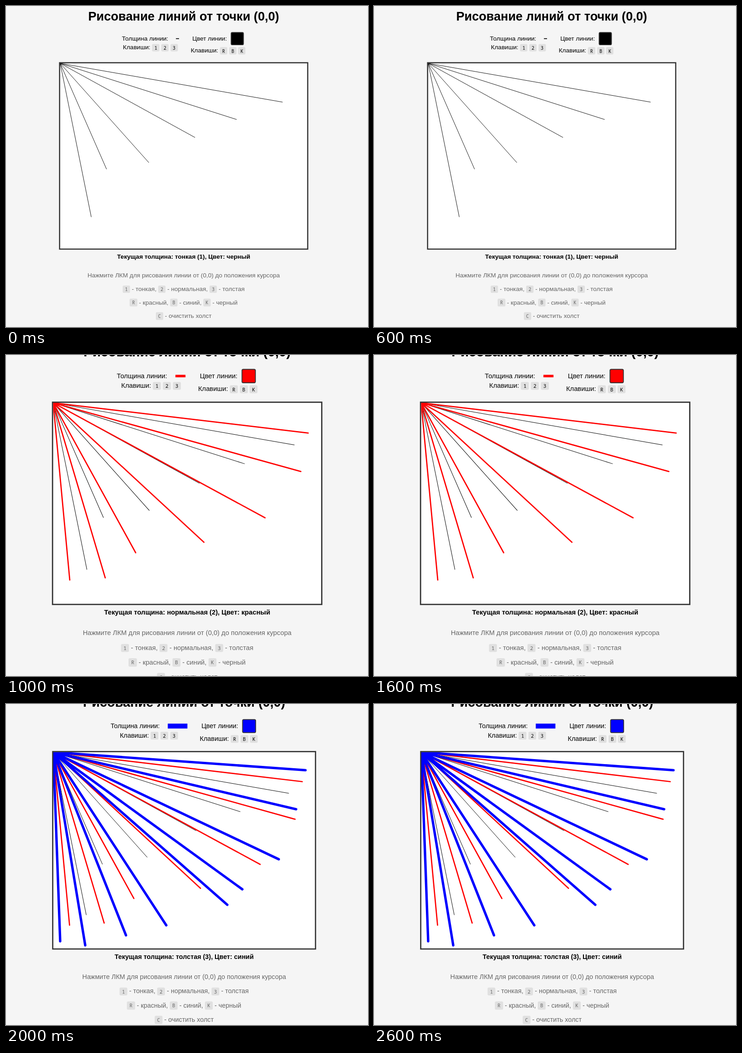
Animation, 795 px wide and 705 px high, one loop 3000 ms. Source, as an HTML page:

```html
<!DOCTYPE html>
<html lang="ru">
<head>
<meta charset="utf-8">
<title>Рисование линий</title>
<style>
  html, body { margin: 0; width: 100%; height: 100%; overflow: hidden; background: #f5f5f5; }
  .stage { position: relative; width: 100%; height: 100%; overflow: hidden; contain: strict; }
  .page {
    position: absolute; left: 0; top: 0; width: 640px; height: 480px;
    transform-origin: 0 0; visibility: hidden;
    font: 16px/20px "Liberation Sans", Arial, sans-serif; color: #000;
  }
  .page.on { visibility: visible; }
  .page > * { position: absolute; white-space: nowrap; }
  .row { left: 0; width: 640px; text-align: center; }
  .title { font-size: 32px; font-weight: bold; }
  .status { font-weight: bold; }
  .help { color: #666; }
  .swatch {
    box-sizing: border-box; width: 34px; height: 34px;
    border: 2px solid #333; border-radius: 4px;
  }
  .board {
    left: -3px; top: -3px; width: 640px; height: 480px;
    border: 3px solid #333; background: #fff;
  }
  .board svg { display: block; overflow: hidden; }
  kbd {
    font: 500 12px/0 "Noto Sans Mono", "DejaVu Sans Mono", monospace;
    padding: 1.5px 6px 1px; border-radius: 3px; background: #e0e0e0;
  }
</style>
</head>
<body>
<div class="stage"></div>
<script>
const STEP = 1000;
const stage = document.querySelector('.stage');

// Each pen keeps its strokes on the board for all later scenes.
const pens = [
  { color: '#000', size: 1.1, name: 'тонкая (1)', hue: 'черный',
    ends: [[576, 100.5], [457, 145.5], [349, 192], [229.5, 257], [120, 274], [80.5, 398]] },
  { color: '#f00', size: 3, name: 'нормальная (2)', hue: 'красный',
    ends: [[609, 72], [591.5, 164], [506, 274.5], [360, 333], [197, 358], [124.3, 418], [39.6, 423]] },
  { color: '#00f', size: 6, name: 'толстая (3)', hue: 'синий',
    ends: [[617, 44], [594, 139.4], [551.5, 262], [462.4, 335.5], [425.6, 373.4],
           [276.3, 423.5], [177.7, 448], [78, 472.5], [16.7, 462.5]] }
];

// Board corner, zoom and width of the thickness sample.
const views = [
  { x: 119, y: 125.9, zoom: 0.8474, w: 8 },
  { x: 103.6, y: 105.1, zoom: 0.9195, w: 24 },
  { x: 104, y: 105.9, zoom: 0.8975, w: 48 }
];

const key = c => `<kbd>${c}</kbd>`;
const keys = s => 'Клавиши: ' + [...s].map(key).join(' ');
const legend = (s, words) => words.map((word, i) => `${key(s[i])} - ${word}`).join(', ');

const row = (cls, base, html) =>
  `<div class="row ${cls}" style="top:${base - (cls === 'title' ? 21.1 : 15.5)}px">${html}</div>`;
const label = (x, base, html) =>
  `<div style="left:${x}px;top:${base - 15.5}px">${html}</div>`;
const box = (cls, x, y, color, size = '') =>
  `<div class="${cls}" style="left:${x}px;top:${y}px;background:${color};${size}"></div>`;

const strokes = ({ color, size, ends }) =>
  `<path d="${ends.map(p => 'M0 0L' + p).join('')}" fill="none" stroke="${color}"
    stroke-width="${size}" stroke-linecap="round"/>`;

function buildPage({ x, y, zoom, w }, i) {
  const { color, name, hue } = pens[i];
  const half = w / 2, h = w / 4;
  const page = document.createElement('div');
  page.className = 'page';
  page.style.transform = `translate(${x}px, ${y}px) scale(${zoom})`;
  page.innerHTML =
    row('title', -110.7, 'Рисование линий от точки (0,0)') +
    label(164 - half, -58.7, 'Толщина линии:') +
    box('sample', 304 - half, -63.8 - h / 2, color, `width:${w}px;height:${h}px`) +
    label(162.6, -35.4, keys('123')) +
    label(338.4 + half, -58.7, 'Цвет линии:') +
    box('swatch', 438.3 + half, -81, color) +
    label(334.3 + half, -27.2, keys('RBK')) +
    `<div class="board"><svg width="640" height="480">${
      pens.slice(0, i + 1).map(strokes).join('')}</svg></div>` +
    row('status', 506.4, `Текущая толщина: ${name}, Цвет: ${hue}`) +
    row('help', 555.6, 'Нажмите ЛКМ для рисования линии от (0,0) до положения курсора') +
    row('help', 590.5, legend('123', ['тонкая', 'нормальная', 'толстая'])) +
    row('help', 625.4, legend('RBK', ['красный', 'синий', 'черный'])) +
    row('help', 660.3, legend('C', ['очистить холст']));
  return stage.appendChild(page);
}

const pages = views.map(buildPage);
const start = performance.now();

function draw() {
  const now = Math.floor((performance.now() - start) / STEP) % pages.length;
  pages.forEach((page, i) => page.classList.toggle('on', i === now));
  requestAnimationFrame(draw);
}
draw();
</script>
</body>
</html>
```
